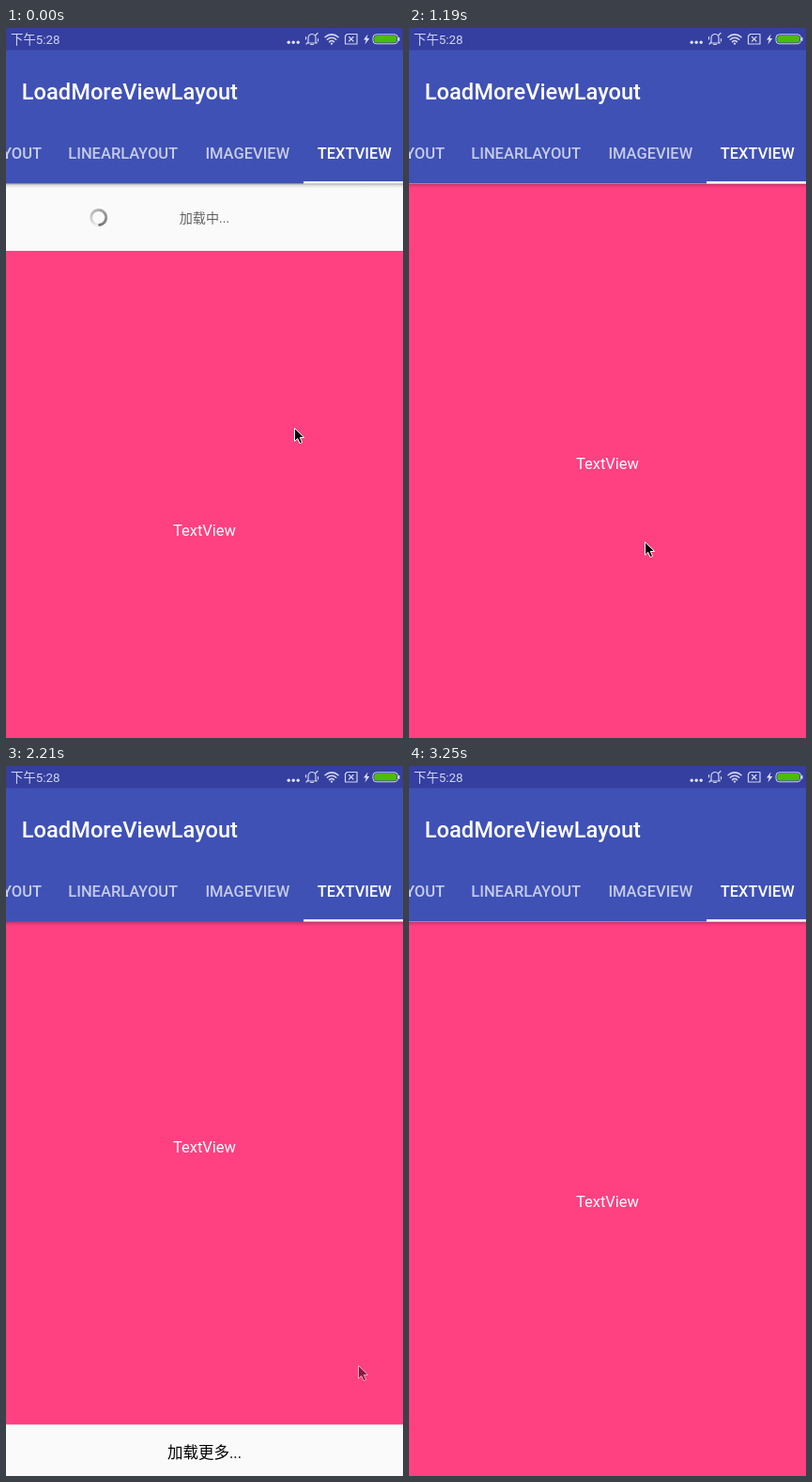
Recreate the animation shown at these times as an HTML page. Size 423 by 755 pixels, loop 3.55 s.

```html
<!DOCTYPE html>
<html lang="zh-CN">
<head>
<meta charset="utf-8">
<title>LoadMoreViewLayout</title>
<style>
  html, body { margin: 0; width: 100%; height: 100%; overflow: hidden; background: #fafafa; }
  svg { display: block; width: 423px; height: 755px; }
  text { font: 16.5px Roboto, 'Noto Sans CJK SC', 'Noto Sans CJK', sans-serif; }
  .mid { text-anchor: middle; }
  .tab { font-weight: 500; fill: #fff; }
  .off { fill-opacity: .7; }
  .icon { fill: none; stroke: #d3d6ed; stroke-width: 1.2; stroke-linecap: round; stroke-linejoin: round; }
</style>
</head>
<body>
<svg viewBox="0 0 423 755">
  <defs>
    <linearGradient id="shade" x2="0" y2="1">
      <stop offset="0" stop-opacity=".3"/>
      <stop offset=".4" stop-opacity=".1"/>
      <stop offset="1" stop-opacity="0"/>
    </linearGradient>
  </defs>
  <rect width="423" height="755" fill="#fafafa"/>

  <g id="page">
    <rect y="166" width="423" height="592.8" fill="#ff4081"/>
    <text class="mid" x="211.5" y="469.4" fill="#fff">TextView</text>
    <text class="mid" id="footer" x="211.5" y="794.2" fill="#000"></text>
    <g id="header">
      <g id="spinner"></g>
      <text class="mid" id="status" x="211.5" y="136" fill="#606060" style="font-size:14.1px"></text>
    </g>
  </g>

  <rect y="165.500" width="423" height="5" fill="url(#shade)"/>
  <rect width="423" height="165.500" fill="#3f51b5"/>
  <rect width="423" height="23.5" fill="#343fa0"/>
  <text x="16.8" y="75.8" fill="#fff" style="font-size:23.65px;font-weight:500">LoadMoreViewLayout</text>
  <text class="tab off" x="38" y="139.3" text-anchor="end">LAYOUT</text>
  <text class="tab off mid" x="124.7" y="139.3">LINEARLAYOUT</text>
  <text class="tab off mid" x="257.3" y="139.3">IMAGEVIEW</text>
  <text class="tab mid" x="371.3" y="139.3">TEXTVIEW</text>
  <rect x="317" y="163.1" width="106" height="2.4" fill="#fff"/>

  <text x="5" y="16.8" fill="#d3d6ed" style="font-size:13.4px">下午5:28</text>
  <g fill="#dfe1f2">
    <circle cx="301.2" cy="15.3" r="1.7"/>
    <circle cx="306.2" cy="15.3" r="1.7"/>
    <circle cx="311.2" cy="15.3" r="1.7"/>
  </g>
  <g class="icon">
    <path d="M322 15V10.500a4 4 0 0 1 8 0V15l1.200 1h-10.400zM324.500 17.500h3M320 17l2-2M329.500 8l2.500-2.500M319.500 9.500v2.500M332.500 11.500v2.500"/>
    <path d="M340 9.700a10 10 0 0 1 14 0M342.300 12.200a6.700 6.700 0 0 1 9.400 0M344.600 14.600a3.400 3.400 0 0 1 4.800 0" stroke-width="1.6"/>
    <circle cx="347" cy="16.600" r=".6"/>
    <path d="M363.500 6.500h10.500v10.500h-12.500v-8.500zM365.500 9.500l4.500 4.500M370 9.500l-4.500 4.500"/>
  </g>
  <path d="M385.600 6.500l-4.600 6h2.700l-1.300 5 4.900-6.400h-2.800z" fill="#dfe1f2"/>
  <rect x="391" y="6.800" width="26.500" height="10" rx="3.500" fill="#343fa0" stroke="#d3d6ed"/>
  <rect x="392.300" y="8.100" width="23.900" height="7.400" rx="2.500" fill="#4cbb0c"/>
  <rect x="418" y="9.700" width="1.500" height="4.200" rx=".7" fill="#d3d6ed"/>

  <path id="cursor" d="M.5 .5V14.500L3.700 11.500L6 16.700L8.600 15.600L6.300 10.500H10.700Z" fill="#000" stroke="#fff"/>
</svg>
<script>
const LOOP = 3550, STEPS = 24, LEAD = 11;
const HEADER = 71, FOOTER = 58.5, GRAB_Y = 554;
const $ = id => document.getElementById(id);

// Pointer gesture: [step, x, y, power of the ease towards this point].
const GESTURE = [[1, 307, 425], [4, 300, 434, .5], [7, 254, 563, 2.2], [8, 251, 546],
  [10, 260, 339], [11, 260, 327], [12, 260, 333], [14, 375, 637, 1.8]];

const progress = (s, from, to) => Math.min(1, Math.max(0, (s - from) / (to - from)));
const mix = (a, b, p) => a + (b - a) * p;
const easeOut = (p, power) => 1 - (1 - p) ** power;
const easeInOut = p => (1 - Math.cos(Math.PI * p)) / 2;

function pointer(s) {
  const i = Math.max(1, GESTURE.findIndex(k => k[0] >= s));
  const a = GESTURE[i - 1], b = GESTURE[s > 14 ? GESTURE.length - 1 : i];
  const p = progress(s, a[0], b[0]) ** (b[3] || 1);
  return { x: mix(a[1], b[1], p), y: mix(a[2], b[2], p) };
}

// Header closes, the finger drags at half speed, the footer snaps in and later closes.
function scrollAt(s) {
  if (s <= 8) return mix(HEADER, 0, easeOut(progress(s, 3.97, 8), 2.5));
  if (s <= 11) return (pointer(s).y - GRAB_Y) / 2;
  if (s <= 13) return mix(scrollAt(11), -FOOTER, easeOut(progress(s, 11, 13), 4.2));
  return mix(-FOOTER, 0, easeInOut(progress(s, 19.4, 21.1)));
}

function buildSpinner() {
  const parts = 36, r = 7.9;
  const point = a => `${(r * Math.cos(a)).toFixed(2)} ${(r * Math.sin(a)).toFixed(2)}`;
  let html = '';
  for (let i = 0; i < parts; i++) {
    const a = i / parts * 2 * Math.PI, b = a + 2 * Math.PI / parts + .03;
    html += `<path d="M${point(a)}A${r} ${r} 0 0 1 ${point(b)}" fill="none" ` +
      `stroke="#6a6a6a" stroke-width="2.8" stroke-opacity="${(.06 + .94 * i / parts).toFixed(2)}"/>`;
  }
  $('spinner').innerHTML = html;
}

function move(id, x, y, extra = '') {
  $(id).setAttribute('transform', `translate(${x} ${y}) ${extra}`);
}

function show(id, opacity) {
  $(id).setAttribute('opacity', opacity);
}

function label(id, text) {
  if ($(id).textContent !== text) $(id).textContent = text;
}

function render(time) {
  // The screen refreshes in even steps.
  const s = Math.min(STEPS - 1, Math.floor((time + LEAD) / LOOP * STEPS));
  const scroll = scrollAt(s);
  const { x, y } = pointer(s);

  move('page', 0, scroll);
  move('spinner', 98.7, 130.5, `rotate(${90 + s * 53})`);
  show('spinner', s < 4 ? 1 : 0);
  show('header', scroll > 0 ? 1 : 0);
  label('status', s < 4 ? '加载中...' : '更新完成.');
  label('footer', s < 12 ? '松开加载' : s < 18 ? '加载更多...' : '加载成功');

  move('cursor', x, y);
  show('cursor', 1 - progress(s, 14, 16));
}

buildSpinner();
render(0);
const start = performance.now();
(function frame() {
  render((performance.now() - start) % LOOP);
  requestAnimationFrame(frame);
})();
</script>
</body>
</html>
```
